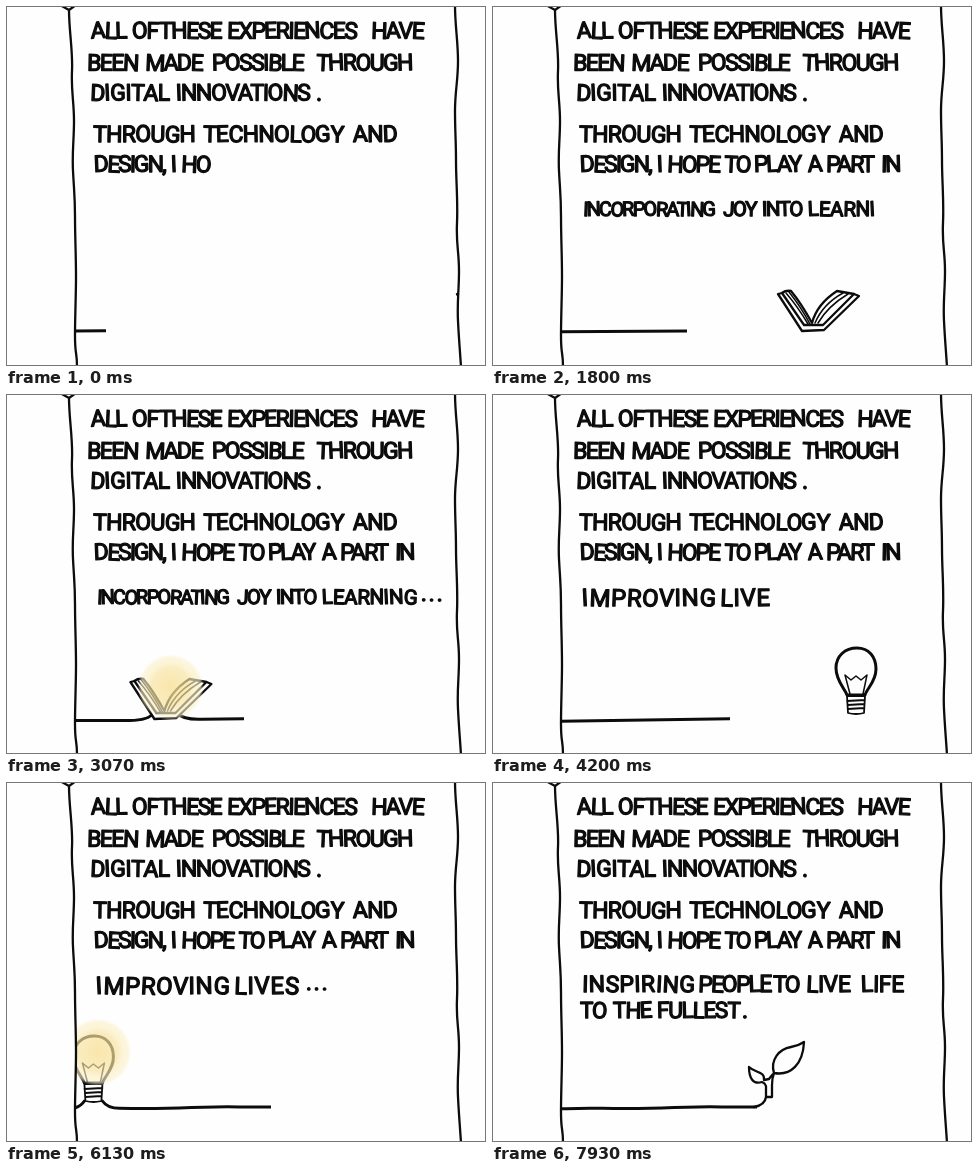
Write an HTML page that moves like this. It is 480 px wide and 360 px high and loops after 8000 ms.

```html
<!DOCTYPE html>
<html lang="en">
<head>
<meta charset="utf-8">
<title>Digital innovations</title>
<style>
  html, body { margin: 0; width: 100%; height: 100%; overflow: hidden; background: #fefefe; }
  svg { display: block; width: 100vw; height: 100vh; }
  text { font-family: Roboto, "Open Sans", sans-serif; fill: #0c0c0c; stroke: #0c0c0c; stroke-width: 1.3; stroke-linejoin: round; white-space: pre; }
  .ink { fill: none; stroke: #0c0c0c; stroke-width: 2.3; stroke-linecap: round; stroke-linejoin: round; }
  .paper { fill: #fefefe; }
  .fine { stroke-width: 1.5; }
  .bold { stroke-width: 3; }
</style>
</head>
<body>
<svg viewBox="0 0 480 360">
  <defs>
    <radialGradient id="light">
      <stop offset="0" stop-color="#f7df92" stop-opacity=".78"/>
      <stop offset=".58" stop-color="#f8e3a0" stop-opacity=".66"/>
      <stop offset=".72" stop-color="#faeec0" stop-opacity=".66"/>
      <stop offset=".9" stop-color="#fbf1cc" stop-opacity=".6"/>
      <stop offset="1" stop-color="#fdf6dd" stop-opacity="0"/>
    </radialGradient>
    <clipPath id="panel"><rect x="69" width="383" height="360"/></clipPath>
    <clipPath id="drawn"><rect id="pen" height="360"/></clipPath>
  </defs>
  <rect width="480" height="360" fill="#fefefe"/>

  <g clip-path="url(#panel)">
    <g clip-path="url(#drawn)"><path id="ground" class="ink bold"/></g>

    <g id="book">
      <path class="ink paper" d="M-35 -37L-11 0L11 -1L46 -35L41 -37L24 -40Q4 -27 -1 -8Q-12 -28 -22 -40Q-27 -41 -31 -38Z"/>
      <path class="ink" d="M-31 -38L-9 -6L10 -6L41 -37"/>
      <path class="ink fine" d="M-27 -38Q-15 -24 -5 -7M-24 -39Q-12 -24 -3 -7M2 -8Q10 -27 30 -38M5 -8Q15 -25 35 -37"/>
      <circle class="glow" cy="-32" r="33" fill="url(#light)"/>
    </g>

    <g id="bulb">
      <path class="ink paper bold" d="M-9 -24C-11 -30 -20 -38 -20 -51C-20 -63 -11 -71 1 -71C13 -71 20 -62 20 -50C20 -37 11 -31 9 -24Z"/>
      <path class="ink fine" d="M-6 -25L-11 -44L-5 -39L0 -43L5 -39L11 -44L7 -25"/>
      <path class="ink paper" style="stroke-width:1.8" d="M-9 -23L9 -23L8 -6Q0 -4 -8 -6ZM-9 -18L9 -19M-8 -14L8 -15M-8 -10L8 -11"/>
      <circle class="glow" cy="-55" r="34" fill="url(#light)"/>
    </g>

    <path id="plant" class="ink" pathLength="1" stroke-dasharray="1 2"
      d="M262 325Q273 323 274 315L274 304Q273 301 270 300C261 303 257 296 257 285C263 291 273 289 272 298L277 297Q279 294 282 291C278 278 287 267 299 265Q306 264 312 260C311 282 299 294 282 291Q280 296 280 303L280 315L274 315"/>
  </g>

  <path class="ink" d="M54 -1L63 4L70 -1M63 4C63 25 67 45 66 65S68 95 68 115S66 145 67 165S69 190 69 210S70 250 70 270S69 310 69 330S71 345 71 361"/>
  <path class="ink" d="M449 -1C449 20 452 35 452 55S449 85 449 105S450 135 450 155S452 195 451 217S453 245 453 265S451 295 452 315S454 345 455 361"/>
  <g id="words"></g>
  <rect x=".5" y=".5" width="479" height="359" fill="none" stroke="#777"/>
</svg>

<script>
const LOOP = 8000, FRAME = LOOP / 120, RATE = 0.0228;
const $ = id => document.getElementById(id);

let seed = 7;
const wobble = () => {
  seed = (seed * 16807) % 2147483647;
  return (seed / 2147483647 - 0.5) * 6;
};

// Places "x:WORD x:WORD" on one baseline and returns the text nodes.
function line(y, spec, size = 23, spacing = -1.3) {
  return spec.split(' ').map(item => {
    const [x, word] = item.split(':');
    const node = document.createElementNS('http://www.w3.org/2000/svg', 'text');
    node.setAttribute('x', x);
    node.setAttribute('y', y);
    node.setAttribute('rotate', [...word].map(() => wobble().toFixed(1)).join(' '));
    node.style.fontSize = size + 'px';
    node.style.letterSpacing = spacing + 'px';
    node.textContent = word;
    $('words').append(node);
    return { node, word };
  });
}

line(32.5, '85:ALL 126:OF 153:THESE 221:EXPERIENCES 365:HAVE', 23, -1.6);
line(64.5, '81:BEEN 139:MADE 206:POSSIBLE 310:THROUGH', 23, -1.6);
line(94.5, '84:DIGITAL', 23, -0.5);
line(94.5, '170:INNOVATIONS 310:.');
line(136, '87:THROUGH 197:TECHNOLOGY 347:AND', 23, -0.7);

const hope = line(166, '88:DESIGN, 165:I 175:HOPE 232:TO 262:PLAY 316:A 334:PART 389:IN', 23, -2);
const learning = [
  ...line(210, '91:INCORPORATING', 20, -1.8),
  ...line(210, '231:JOY 270:INTO', 20.5, -1.5),
  ...line(210, '316:LEARNING', 20.5, -0.3),
  ...line(207, '415:...', 22, 2)
];
const lives = [
  ...line(212, '90:IMPROVING 228:LIVES', 24, 0.6),
  ...line(208, '300:...', 22, 2)
];
const fullest = [
  ...line(210, '90:INSPIRING', 23, 0.4),
  ...line(210, '206:PEOPLE 281:TO', 23, -1.8),
  ...line(210, '314:LIVE 369:LIFE', 23, -0.4),
  ...line(236, '88:TO 121:THE', 22.5),
  ...line(236, '165:FULLEST', 22.5, -1.2),
  ...line(236, '250:.')
];

// Writing runs: words, start, letters already there, time of erasing.
const runs = [
  { words: hope, start: 0, done: 10, end: LOOP },
  { words: learning, start: 0, done: -15, end: 3560 },
  { words: lives, start: 3620, done: 0, end: 6200 },
  { words: fullest, start: 6210, done: 0, end: LOOP }
];

const clamp = v => Math.max(0, Math.min(1, v));

function track(t, keys) {
  let value = keys[0][1];
  for (let i = 1; i < keys.length; i++) {
    const [t0, a] = keys[i - 1], [t1, b] = keys[i];
    if (t >= t0) value = a + (b - a) * clamp((t - t0) / (t1 - t0));
  }
  return value;
}

const penKeys = [[0, 100], [1800, 195], [2600, 238], [4200, 238], [5000, 265]];
const things = [
  { el: $('book'), half: 12, slope: 24, lit: 2500, lean: 6, keys: [[500, 486], [1800, 321], [3070, 159], [4270, 6]] },
  { el: $('bulb'), half: 9, slope: 17, lit: 5000, lean: 0, keys: [[3300, 476], [4200, 364], [5400, 216], [6130, 88], [6700, -12]] }
];

const groundY = x => 327 - (x - 70) * 0.012 + Math.sin(x / 19) * 0.4;

function write(t) {
  for (const { words, start, done, end } of runs) {
    let left = t < start || t >= end ? 0 : Math.floor(done + (t - start) * RATE + 0.01);
    for (const { node, word } of words) {
      const shown = word.slice(0, Math.max(0, left));
      if (node.textContent !== shown) node.textContent = shown;
      left -= word.length;
    }
  }
}

function draw(t) {
  write(t);
  $('pen').setAttribute('width', track(t, penKeys));

  // The ground rises to meet the foot of each thing standing on it.
  const point = x => `${x} ${groundY(x)}`;
  let d = 'M-200 327', last = 0;
  for (const { el, half, slope, lit, lean, keys } of things) {
    const x = track(t, keys), a = x - half, b = x + half;
    el.setAttribute('transform', `translate(${x} 325)`);
    const glow = el.querySelector('.glow');
    glow.setAttribute('cx', lean + (150 - x) * 0.07);
    glow.style.opacity = clamp((t - lit) / 330);
    d += `L${point(a - slope)}Q${point(a - 5)} ${a} 319M${b} 319Q${point(b + 5)} ${point(b + slope)}`;
    last = b + slope;
  }
  for (let x = last; x < 460; x += 12) d += 'L' + point(x);
  $('ground').setAttribute('d', d);

  const grown = clamp((t - 6900) / 950);
  $('plant').style.visibility = grown ? 'visible' : 'hidden';
  $('plant').setAttribute('stroke-dashoffset', 1 - grown);
}

const began = performance.now();
function tick() {
  const t = (performance.now() - began) % LOOP;
  draw(Math.floor((t + 4) / FRAME) % 120 * FRAME + 0.01);
  requestAnimationFrame(tick);
}
tick();
</script>
</body>
</html>
```
